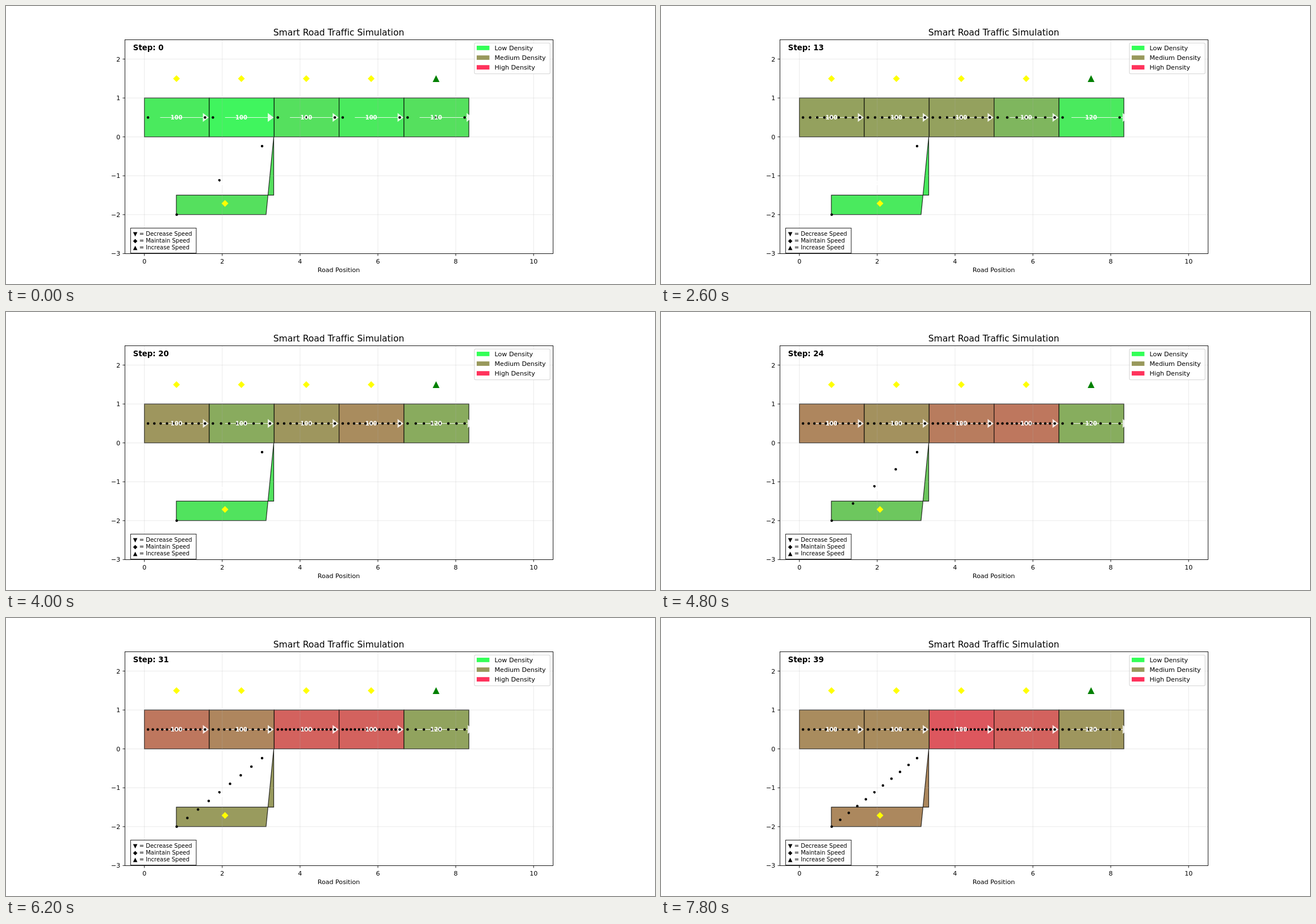
An HTML page for the animation above (8 s loop, 1143 by 490 pixels).

```html
<!DOCTYPE html>
<html lang="en">
<head>
<meta charset="utf-8">
<title>Smart Road Traffic Simulation</title>
<style>
  html, body { margin: 0; width: 100%; height: 100%; overflow: hidden; background: #fff; }
  svg { display: block; width: 1143px; height: 490px; }
  text { font: 11.11px "DejaVu Sans", sans-serif; font-variant-ligatures: none; }
  .title { font-size: 15.55px; }
  .step { font-size: 13.33px; font-weight: bold; }
  .key text { font-size: 10px; }
  .speed { font-size: 10px; font-weight: bold; fill: #fff; }
  .mid { text-anchor: middle; }
  .end { text-anchor: end; }
  .road { stroke: #000; stroke-opacity: .8; stroke-width: 1.2; }
  .arrow { fill: #fff; stroke: #fff; stroke-width: 1.1; opacity: .85; }
  .grid { stroke: #b0b0b0; stroke-opacity: .3; stroke-width: .89; }
  .axis { stroke: #000; stroke-width: .89; fill: none; }
  .dots { stroke: #000; stroke-width: 4.5; stroke-linecap: round; fill: none; }
</style>
</head>
<body>
<svg viewBox="0 0 1143 490">
  <g id="roads"></g>
  <path id="grid" class="grid"/>
  <path id="ticks" class="axis"/>
  <rect class="axis" x="209.5" y="59.5" width="754" height="377"/>
  <g id="dots" class="dots"></g>
  <g id="signs"></g>
  <g id="labels"></g>
  <text class="title mid" x="586" y="52">Smart Road Traffic Simulation</text>
  <text class="mid" x="586" y="469">Road Position</text>
  <text class="step" id="step" x="223.8" y="77.5">Step: 0</text>
  <g class="key">
    <rect x="219.5" y="391.5" width="115.5" height="44" fill="#fff" fill-opacity=".8" stroke="#333" stroke-width="1.1"/>
    <text x="223.8" y="404.7">▼ = Decrease Speed</text>
    <text x="223.8" y="417">◆ = Maintain Speed</text>
    <text x="223.8" y="429.4">▲ = Increase Speed</text>
  </g>
  <rect x="825" y="65.2" width="133.2" height="54.3" rx="2.2" fill="#fff" fill-opacity=".8" stroke="#ccc" stroke-opacity=".8" stroke-width="1.1"/>
  <g id="legend"></g>
</svg>
<script>
const STEP = 200, STEPS = 40;
const X0 = 243.7, Y0 = 230.7, UNIT = 68.55, WIDTH = 114.3;
const LANE = Y0 - UNIT / 2;

// Load per section (five road sections, then the ramp) at a few steps
const loads = [
  [0, 2, 1, 3, 2, 3, 3],
  [8, 6, 4, 2, 1, 1, 1],
  [13, 9, 9, 9, 7, 2, 2],
  [20, 10, 8, 10, 11, 8, 2.7],
  [28, 13, 13, 15, 15, 7.6, 8],
  [34, 13, 10, 15, 15, 10, 11],
  [39, 11, 11, 16, 15, 10, 11.3]
];

const $ = id => document.getElementById(id);

function add(parent, tag, attrs, text) {
  const el = document.createElementNS('http://www.w3.org/2000/svg', tag);
  for (const k in attrs) el.setAttribute(k, attrs[k]);
  if (text !== undefined) el.textContent = text;
  parent.appendChild(el);
  return el;
}

const diamond = (x, y) => `M${x} ${y - 6}l6 6l-6 6l-6-6z`;

const arrow = (start, neck) =>
  `M${start} ${LANE}H${neck}M${neck} ${LANE - 6.8}l9 6.8l-9 6.8z`;

// Axes
let grid = '', ticks = '';
for (let v = 0; v <= 10; v += 2) {
  const x = X0 + v * UNIT;
  grid += `M${x} 59.5V436.5`;
  ticks += `M${x} 436.5v4`;
  add($('labels'), 'text', { class: 'mid', x, y: 453.6 }, v);
}
for (let v = -3; v <= 2; v++) {
  const y = Y0 - v * UNIT;
  grid += `M209.5 ${y}H963.5`;
  ticks += `M209.5 ${y}h-4`;
  add($('labels'), 'text', { class: 'end', x: 201.3, y: y + 4.1 }, v < 0 ? '−' + -v : v);
}
$('grid').setAttribute('d', grid);
$('ticks').setAttribute('d', ticks);

// Legend
[['#33ff57', 'Low'], ['#99995c', 'Medium'], ['#ff335c', 'High']].forEach(([fill, name], i) => {
  const y = 70 + i * 17.1;
  add($('legend'), 'rect', { x: 829, y, width: 22.4, height: 7.8, fill });
  add($('legend'), 'text', { x: 860.5, y: y + 7.8 }, name + ' Density');
});

// Road sections and ramp
const sections = [];
for (let i = 0; i < 5; i++) {
  const x = X0 + i * WIDTH, mid = x + WIDTH / 2 - .6;
  const last = i === 4;
  sections.push({
    from: [x + 6.4, LANE], to: [x + 106.8, LANE],
    road: add($('roads'), 'path', { class: 'road', d: `M${x} ${Y0}h${WIDTH}v${-UNIT}h${-WIDTH}z` }),
    arrow: add($('roads'), 'path', { class: 'arrow', d: arrow(mid - 28.8, mid + 47) }),
    label: add($('labels'), 'text', { class: 'speed mid', x: mid, y: LANE + 3.5 }, 100),
    mid
  });
  add($('signs'), 'path', last
    ? { d: `M${mid} 122l6 12h-12z`, fill: '#008000' }
    : { d: diamond(mid, 128), fill: '#ff0' });
}
sections.push({
  from: [300.6, 367.7], to: [451, 247],
  road: add($('roads'), 'path', { class: 'road', d: 'M300 333.4H471.5V231L458 367.6H300z' })
});
add($('signs'), 'path', { d: diamond(385.7, 348), fill: '#ff0' });
add($('labels'), 'text', { class: 'speed mid', x: 376, y: 315.8 }, 60);
for (const s of sections) s.dots = add($('dots'), 'path', {});

function loadAt(step, i) {
  const k = Math.max(1, loads.findIndex(row => row[0] >= step));
  const a = loads[k - 1], b = loads[k];
  return a[i + 1] + (b[i + 1] - a[i + 1]) * (step - a[0]) / (b[0] - a[0]);
}

function dotPath({ from, to }, n) {
  let d = '';
  for (let j = 0; j < n; j++) {
    const t = n > 1 ? j / (n - 1) : 0;
    const [x, y] = from.map((p, c) => p + (to[c] - p) * t);
    d += `M${x.toFixed(2)} ${y.toFixed(2)}h.01`;
  }
  return d;
}

function draw(step) {
  $('step').textContent = 'Step: ' + step;
  sections.forEach((s, i) => {
    const load = loadAt(step, i);
    s.road.setAttribute('fill', `rgb(${Math.round(53 + 10.5 * load)},${Math.round(255 - 10.5 * load)},94)`);
    s.dots.setAttribute('d', dotPath(s, Math.floor(load + 1e-6)));
  });
  const exit = sections[4], fast = step > 0;
  exit.label.textContent = fast ? 120 : 110;
  exit.arrow.setAttribute('d', fast
    ? arrow(exit.mid - 34.6, exit.mid + 56.2)
    : arrow(exit.mid - 29, exit.mid + 54.4));
}

let shown = -1;
function tick() {
  const step = Math.floor(performance.now() / STEP) % STEPS;
  if (step !== shown) draw(shown = step);
  requestAnimationFrame(tick);
}
tick();
</script>
</body>
</html>
```
